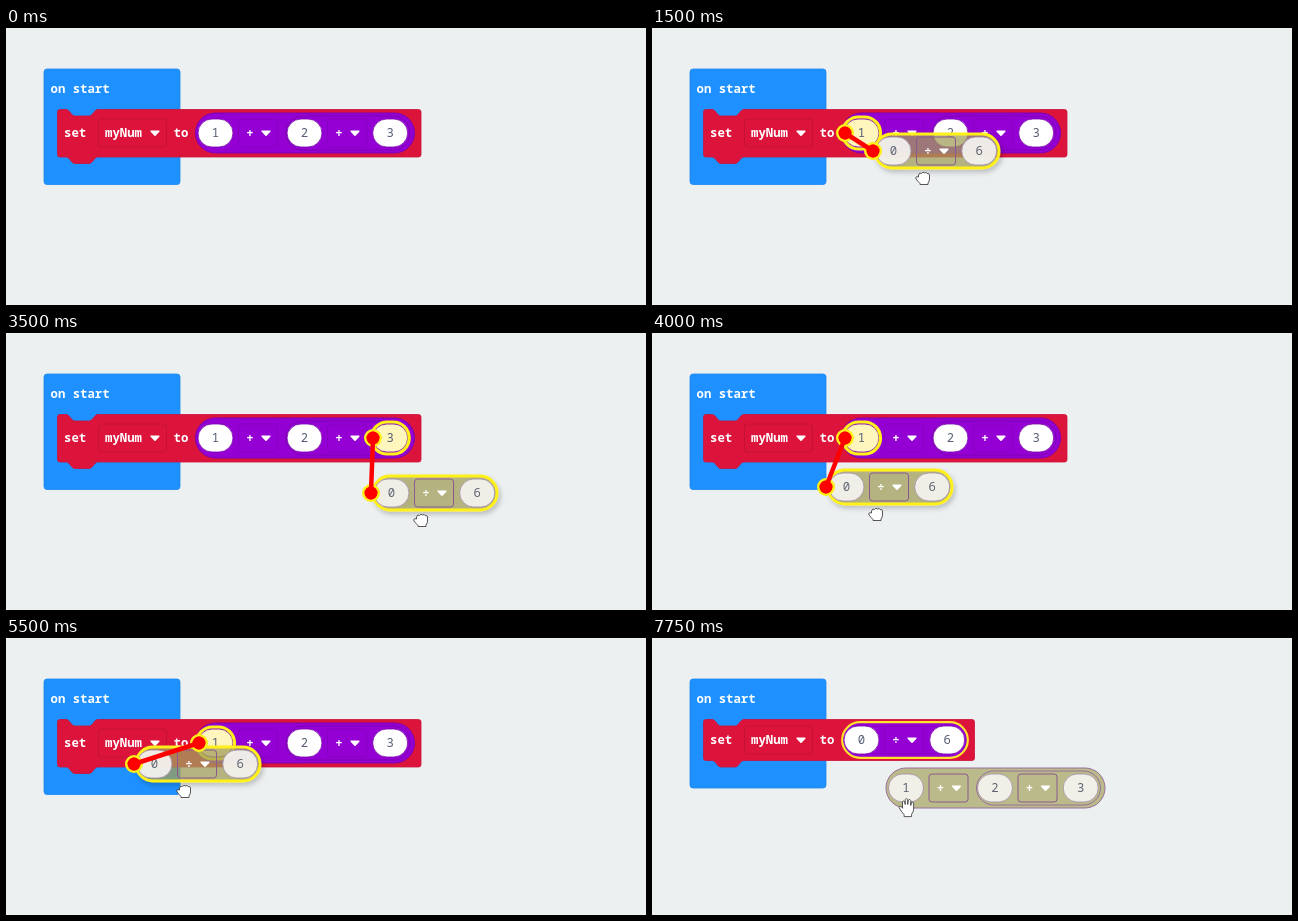
Recreate the animation shown at these times as an HTML page. Size 640x277 px, loop 8 s.

```html
<!DOCTYPE html>
<html lang="en">
<head>
<meta charset="utf-8">
<title>Dragging a math block</title>
<style>
  html, body { margin: 0; width: 100%; height: 100%; overflow: hidden; background: #ecf0f1; }
  svg { display: block; width: 100vw; height: 100vh; }
  text { font: 12.3px "Noto Sans Mono", "DejaVu Sans Mono", monospace; }
  .label { font-weight: 700; fill: #fff; }
</style>
</head>
<body>
<svg id="stage" viewBox="0 0 640 277">
  <defs>
    <filter id="shadow" x="-20%" y="-40%" width="140%" height="190%">
      <feDropShadow dx="2" dy="3" stdDeviation="2.5" flood-color="#000" flood-opacity=".22"/>
    </filter>
  </defs>
  <g id="scene"></g>
</svg>
<script>
const LOOP = 8000, STEP = 250, START = 500, DROP = 7250;
const YELLOW = '#fff01a';
const scene = document.getElementById('scene');

// Left end of the dragged block and the slot it would snap to, one per step
const drag = [
  [259, 250], [255, 215], [245, 175], [232, 145, 'one'], [221, 123, 'one'], [221, 123, 'one'],
  [240, 126, 'one'], [272, 132, 'two'], [315, 138, 'two'], [354, 141, 'three'], [394, 147, 'three'],
  [407, 152, 'three'], [365, 160, 'three'], [268, 163, 'two'], [174, 154, 'one'], [146, 160, 'one'],
  [144, 152, 'one'], [143, 140, 'one'], [95, 133, 'one'], [84, 128, 'one'], [128, 126, 'one'],
  [160, 125, 'all'], [167, 125, 'all'], [169, 125, 'all']
];
const slotX = { one: 193, two: 281, three: 367, all: 189 };

// grow: how far the outline lies outside the block's body
const solid = { fill: '#9400d3', edge: '#7d00b4', box: '#8700c1', num: '#fff', rim: '#7600a8', ink: '#575e75' };
const ghost = { fill: 'rgba(167,164,95,.7)', edge: '#98709c', box: '#8a5a8c',
  num: 'rgba(246,245,240,.92)', rim: '#a08ca4', ink: '#5f6474' };
const nestedGhost = { ...ghost, fill: 'none' };
const carried = { ...ghost, edge: YELLOW, width: 3 };
const selected = { ...solid, edge: '#ffe32a', width: 2.2, grow: .8 };
const target = { ...ghost, fill: '#d2aa90', edge: YELLOW, width: 3.5, grow: 2, box: '#a8586e',
  num: '#e6cdbf', rim: '#c09aa0' };
const nestedTarget = { ...solid, fill: '#a951bb', edge: '#8c1fb4', box: '#8a1ab0',
  num: '#d9abdc', rim: '#b573c4' };

const pill = (x, y, w, h, fill, stroke, width = 1) =>
  `<rect x="${x}" y="${y - h / 2}" width="${w}" height="${h}" rx="${h / 2}"
    fill="${fill}" stroke="${stroke}" stroke-width="${width}"/>`;

const body = (x, y, w, h, { fill, edge, width, grow = 0 }) =>
  pill(x - grow, y, w + 2 * grow, h + 2 * grow, fill, edge, width);

const arrow = (x, y) =>
  `<path d="M${x - 3.8} ${y - 1.8}h7.6l-3.8 4z" fill="#fff" stroke="#fff" stroke-width="1.6" stroke-linejoin="round"/>`;

const frame = (x, y, w, color) =>
  `<rect x="${x}" y="${y - 14}" width="${w}" height="28" rx="3" fill="none" stroke="${color}"/>`;

const label = (x, y, text) => `<text class="label" x="${x}" y="${y + 4}">${text}</text>`;

function number(x, y, value, look, hot) {
  return pill(x - 17.5, y, 35, 28, hot ? '#fff6bd' : look.num, look.rim, .8) +
    (hot ? pill(x - 19, y, 38, 32, 'none', YELLOW, 3.2) : '') +
    `<text x="${x}" y="${y + 4.3}" text-anchor="middle" fill="${look.ink}">${value}</text>`;
}

function operator(x, y, sign, look) {
  return frame(x + 43.5, y, 39, look.box) +
    `<text class="label" x="${x + 55}" y="${y + 4.3}" text-anchor="middle">${sign}</text>` + arrow(x + 71, y);
}

function pair(x, y, a, sign, b, look, hot = {}) {
  return body(x + 2, y, 124, 34, look) +
    number(x + 20.5, y, a, look, hot.left) + operator(x, y, sign, look) +
    number(x + 106.2, y, b, look, hot.right);
}

function sum(x, y, look, inner, slot) {
  return body(x + .5, y, 219, 40, look) +
    operator(x, y, '+', look) +
    pair(x + 89, y, 2, '+', 3, inner, { left: slot === 'two', right: slot === 'three' }) +
    number(x + 20.5, y, 1, look, slot === 'one');
}

function program(right, bottom, row) {
  return `<rect x="38" y="41" width="136" height="${bottom - 13.5}" rx="3" fill="#1e90ff" stroke="#1c88f0" stroke-width=".8"/>
    <path d="M51.5 84q0-2.5 2.5-2.5h6c4 0 5 6.5 9 6.5h14c4 0 5-6.5 9-6.5H${right - 2.5}q2.5 0 2.5 2.5
      V${bottom - 2.5}q0 2.5-2.5 2.5H92c-4 0-5 6.5-9 6.5H69c-4 0-5-6.5-9-6.5h-6q-2.5 0-2.5-2.5z"
      fill="#dc143c" stroke="#cc1238" stroke-width=".8"/>` +
    label(44.5, 61, 'on start') + label(58, row, 'set') + label(99, row, 'myNum') + label(167.5, row, 'to') +
    frame(92.5, row, 68, '#c41236') + arrow(149, row);
}

const fullProgram = () => program(415, 129, 105);

function connector(x, y, slot) {
  if (!slot) return '';
  const sx = slotX[slot];
  const ring = (cx, cy) => `<circle cx="${cx}" cy="${cy}" r="7.7" fill="red" stroke="${YELLOW}" stroke-width="2.6"/>`;
  return ring(sx, 105) + ring(x, y) +
    `<path d="M${sx} 105L${x} ${y}" stroke="red" stroke-width="4.5"/>
     <circle cx="${sx}" cy="105" r="6.4" fill="red"/><circle cx="${x}" cy="${y}" r="6.4" fill="red"/>`;
}

const hand = (x, y, shape) =>
  `<path transform="translate(${x} ${y})" d="${shape}" fill="#fff" stroke="#444" stroke-width=".9" stroke-linejoin="round"/>`;
const fist = 'M-5-3q1-3 3-1.5q1.5-2.5 3-.5q2-1.5 2.7.7q2-.8 2.3 1.3v4q0 2-1.5 4v1.5h-8v-1q-2-2-4-4.5q-1-3 2.500-2z';
const open = 'M-4.5 1v-6q.5-2 2.2-.5l.5 3v-5q1-2 2.5 0v5l.6-4.5q1.5-1.5 2.4.5v5l.8-3q1.7-1 2.1.6v6q0 3-2 5v2.5h-7.500v-2q-3-3-5-7q0-2.5 4 .4z';

function dragging(step) {
  const [x, y, slot] = drag[step];
  const whole = slot === 'all';
  return fullProgram() +
    sum(189, 105, whole ? target : solid, whole ? nestedTarget : solid, slot) +
    `<g filter="url(#shadow)">${pair(x, y, 0, '÷', 6, carried)}</g>` +
    connector(x, y, slot) + hand(x + 50.5, y + 27, fist);
}

function dropped(step) {
  const p = Math.min(step / 2, 1);
  return program(322.5, 122.5, 102) + pair(189, 102, 0, '÷', 6, selected) +
    sum(233.5, 150, ghost, nestedGhost) + hand(219 + 36 * p, 152 + 17 * p, open);
}

function render(t) {
  if (t < START) return fullProgram() + sum(189, 105, solid, solid);
  if (t >= DROP) return dropped(Math.floor((t - DROP) / STEP));
  return dragging(Math.min(Math.floor((t - START) / STEP), drag.length - 1));
}

let shown = -1;
function tick() {
  const t = performance.now() % LOOP;
  const step = Math.floor(t / STEP);
  if (step !== shown) {
    scene.innerHTML = render(t);
    shown = step;
  }
  requestAnimationFrame(tick);
}
tick();
</script>
</body>
</html>
```
